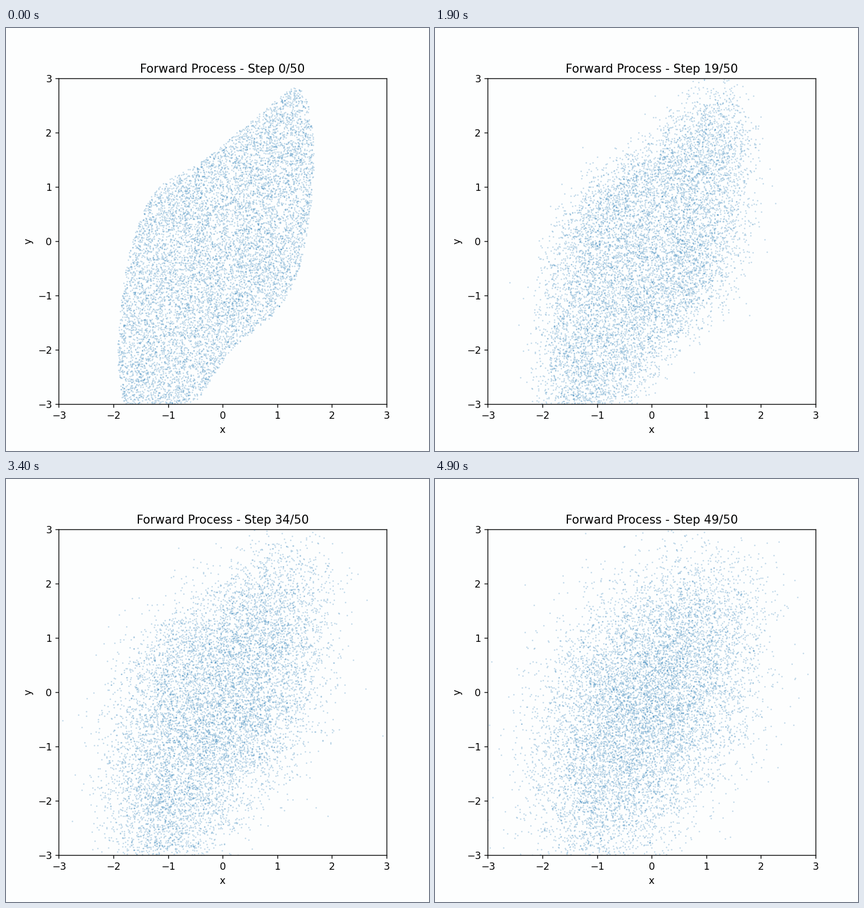
Animation, 748 px wide and 748 px high, one loop 5000 ms. Source, as a matplotlib script:

```python
import numpy as np
import matplotlib.pyplot as plt
from matplotlib.animation import FuncAnimation
from matplotlib.path import Path

SIZE, DPI = 748, 125
STEPS = 50
COUNT = 10000
INTERVAL = 100
BACKGROUND = "#fdfefe"

# Key points of the starting cloud, counter-clockwise from the upper tip.
KEY_POINTS = [
    (1.30, 2.83), (0.64, 2.32), (-0.40, 1.47), (-1.19, 0.97), (-1.61, 0.13),
    (-1.84, -0.96), (-1.90, -2.50), (-1.45, -3.90), (-0.53, -3.00),
    (0.17, -2.00), (1.00, -1.27), (1.44, -0.34), (1.67, 1.30), (1.57, 2.48),
]


def closed_spline(points, samples=20):
    """Smooth closed Catmull-Rom curve through the points."""
    start = np.array(points)
    end = np.roll(start, -1, axis=0)
    tangent = (end - np.roll(start, 1, axis=0)) / 2
    next_tangent = np.roll(tangent, -1, axis=0)
    t = np.linspace(0, 1, samples, endpoint=False)[:, None]
    ease = t * t * (3 - 2 * t)
    curve = (
        start[:, None] * (1 - ease)
        + end[:, None] * ease
        + tangent[:, None] * t * (1 - t) ** 2
        - next_tangent[:, None] * t * t * (1 - t)
    )
    return curve.reshape(-1, 2)


def sample_inside(outline, count, rng):
    """Uniform points inside a closed outline."""
    low, high = outline.min(axis=0), outline.max(axis=0)
    candidates = rng.uniform(low, high, (4 * count, 2))
    return candidates[Path(outline).contains_points(candidates)][:count]


def diffuse(points, betas, rng):
    """Every state of the noising chain, starting with the clean points."""
    states = [points]
    for beta in betas:
        noise = rng.standard_normal(points.shape)
        points = np.sqrt(1 - beta) * points + np.sqrt(beta) * noise
        states.append(points)
    return states


rng = np.random.default_rng(42)
betas = np.linspace(1e-4, 0.02, STEPS)
states = diffuse(sample_inside(closed_spline(KEY_POINTS), COUNT, rng), betas, rng)

# The small surplus keeps the pixel size from being rounded down.
side = (SIZE + 0.01) / DPI
fig, ax = plt.subplots(figsize=(side, side), dpi=DPI, facecolor=BACKGROUND)
fig.subplots_adjust(
    left=93.4 / SIZE, right=672.8 / SIZE, bottom=1 - 664.8 / SIZE, top=1 - 89.2 / SIZE
)
ax.set(xlim=(-3, 3), ylim=(-3, 3), xlabel="x", ylabel="y", facecolor=BACKGROUND)
cloud = ax.scatter(*states[0].T, s=2, alpha=0.3, color="tab:blue", linewidths=0)
title = ax.set_title("")


def update(step):
    cloud.set_offsets(states[step])
    title.set_text(f"Forward Process - Step {step}/{STEPS}")
    return cloud, title


anim = FuncAnimation(fig, update, frames=STEPS, interval=INTERVAL, repeat=True)
plt.show()
```
